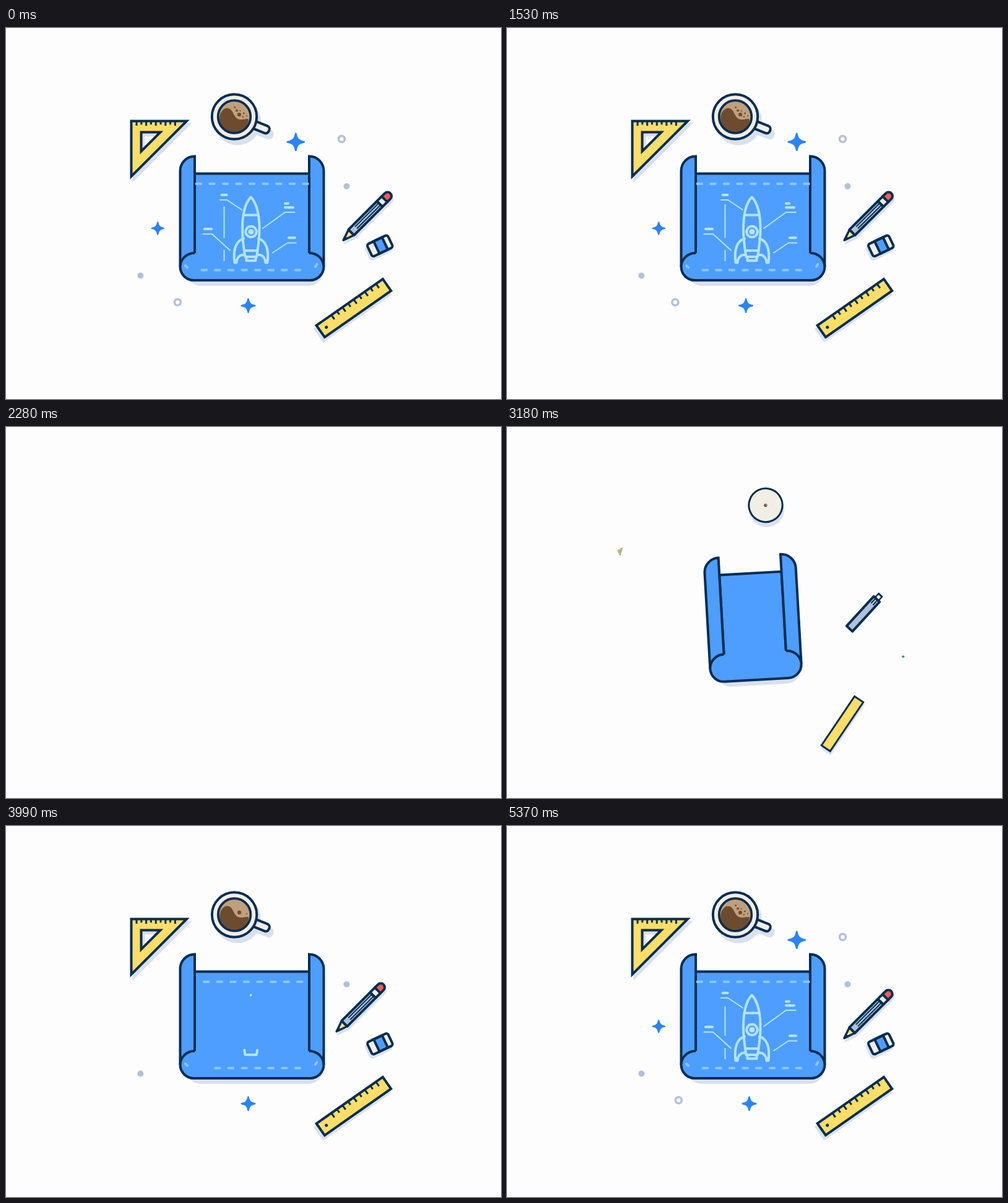
An HTML page that plays this animation: 800x600 px, repeating every 5.4 s.

```html
<!DOCTYPE html>
<html lang="en">
<head>
<meta charset="utf-8">
<title>Blueprint desk</title>
<style>
html, body { margin: 0; width: 100%; height: 100%; overflow: hidden; background: #fdfdfd; }
svg { display: block; width: 100%; height: 100%; }
.ink { stroke: #032d50; stroke-width: 4; }
.shade { fill: #d9e0ee; stroke: #d9e0ee; stroke-width: 4; }
.yellow { fill: #ffde68; }
.cream { fill: #f1eee6; }
.blue { fill: #4d9eff; }
.draw { fill: none; stroke: #b5e3ff; stroke-width: 4; stroke-linecap: round; stroke-linejoin: round; }
.thin { stroke-width: 2; }
.dash { fill: none; stroke: #8cc6ff; stroke-width: 4; stroke-linecap: round; }
.none { fill: none; }
</style>
</head>
<body>
<svg viewBox="0 0 800 600" id="stage">
  <g id="ringA"><circle r="5" fill="#fdfdfd" stroke="#b2c1d8" stroke-width="3.6"/></g>
  <g id="ringB"><circle r="5" fill="#fdfdfd" stroke="#b2c1d8" stroke-width="3.6"/></g>
  <g id="dotA"><circle r="5" fill="#b2c1d8"/></g>
  <g id="dotB"><circle r="5" fill="#b2c1d8"/></g>
  <g id="starA"></g><g id="starB"></g><g id="starC"></g>

  <g id="triangle">
    <path class="shade" fill-rule="evenodd" transform="translate(4 5)" d="M-29.5 -29.5H60L-29.5 60ZM-13.5 -11.5V19.5L17.5 -11.5Z"/>
    <path class="ink yellow" fill-rule="evenodd" d="M-29.5 -29.5H60L-29.5 60ZM-13.5 -11.5V19.5L17.5 -11.5Z"/>
    <path class="ink none" id="triTicks" style="stroke-width:3"/>
  </g>

  <g id="ruler">
    <g transform="translate(-2 6)"><rect class="shade" transform="rotate(-35)" x="-65.5" y="-11.6" width="131" height="23.2"/></g>
    <g transform="rotate(-35)">
      <rect class="ink yellow" x="-65.5" y="-11.6" width="131" height="23.2"/>
      <path class="ink none" id="rulerTicks" style="stroke-width:3"/>
      <circle id="hole" cx="-54" r="2.5" fill="#032d50"/>
    </g>
  </g>

  <g id="eraser">
    <g transform="translate(-2 5)"><rect class="shade" transform="rotate(-25.5)" x="-18.5" y="-11" width="37" height="22" rx="3.5"/></g>
    <g transform="rotate(-25.5)">
      <rect class="cream" x="-18.5" y="-11" width="37" height="22" rx="3.5"/>
      <rect class="ink blue" x="-6" y="-11" width="15" height="22"/>
      <rect class="ink none" x="-18.5" y="-11" width="37" height="22" rx="3.5"/>
    </g>
  </g>

  <g id="cup">
    <g class="shade" transform="translate(5 8)">
      <circle r="36"/>
      <rect data-grip transform="rotate(22)" x="30" y="-6.2" width="30.5" height="12.4" rx="5.5"/>
    </g>
    <rect class="ink cream" data-grip transform="rotate(22)" x="30" y="-6.2" width="30.5" height="12.4" rx="5.5"/>
    <circle class="ink cream" r="36.2"/>
    <g id="coffee">
      <circle r="26.5" fill="#c0a07c"/>
      <path fill="#6d4b2f" d="M-22.5 -5C-17 -16 -8 -17 -3 -8C1 0 3 4 10 4.500C15 5 19 2.500 23 4A23.500 23.500 0 1 1 -22.500 -5Z"/>
      <g id="bubbles" fill="#6d4b2f"></g>
      <circle class="ink none" r="26.300" style="stroke-width:3.7"/>
    </g>
  </g>

  <g id="pencil">
    <g transform="translate(-40.5 39.500)">
      <g transform="translate(2 5)"><path class="shade" id="pencilShade" transform="rotate(-45)" d="M4 0L19 -5.500H102A5.500 5.500 0 0 1 102 5.500H19Z"/></g>
      <g transform="rotate(-45)" stroke-linejoin="round">
        <g id="cap"><path class="ink" fill="#ff5a52" d="M0 -6.400H8A6.400 6.400 0 0 1 8 6.400H0Z"/></g>
        <g id="ferrule"><rect class="ink cream" y="-6.400" width="11" height="12.800"/></g>
        <g id="nib">
          <path class="ink" fill="#ffe28c" style="stroke-width:3.5" d="M-18 0L0 -6.200V6.200Z"/>
          <path fill="#032d50" d="M-19 0L-11 -3V3Z"/>
        </g>
        <g id="shaft">
          <rect class="ink" fill="#b0c1da" y="-6.400" width="65" height="12.800"/>
          <path class="ink none" id="grooves" style="stroke-width:1.9"/>
        </g>
      </g>
    </g>
  </g>

  <g id="scroll">
    <g transform="translate(-17.5 0)">
      <rect class="shade" id="sheetShade" y="-60" height="167" rx="22"/>
      <path class="ink blue" id="sheet"/>
      <path class="ink blue" id="curlL"/>
      <path class="ink blue" id="curlR"/>
      <path class="ink blue" id="roll"/>
    </g>
    <g id="plan" transform="translate(-415 -308)">
      <path class="dash" id="dashTop" stroke-linecap="butt"/>
      <path class="dash" id="dashLow"/>
      <path class="dash" id="dashEnds" d="M290 384.500L293 387.500M500 386L502.500 382"/>
      <g id="lines"></g>
      <path class="draw thin" id="rule" style="stroke-linecap:butt"/>
      <circle id="badge" cx="396" cy="329.500" fill="#b5e3ff"/>
    </g>
  </g>
</svg>
<script>
const LOOP = 5400;
const $ = id => document.getElementById(id);
const NS = 'http://www.w3.org/2000/svg';
const clamp = u => Math.max(0, Math.min(1, u));
const span = (t, start, dur) => clamp((t - start) / dur);
const out = u => 1 - (1 - u) ** 3;
const inOut = u => u < .5 ? 4 * u ** 3 : 1 - 4 * (1 - u) ** 3;
const back = u => 1 + 2.4 * (u - 1) ** 3 + 1.4 * (u - 1) ** 2;
const pop = (t, start, dur = 260) => t <= start ? 0 : back(span(t, start, dur));
const lerp = (a, b, u) => a + (b - a) * u;
const show = (el, on) => el.setAttribute('visibility', on ? 'inherit' : 'hidden');
const place = (el, x, y, r, sx, sy = sx) => {
  show(el, sx > .001);
  el.setAttribute('transform', `translate(${x} ${y}) rotate(${r}) scale(${sx} ${sy})`);
};
const add = (parent, tag, attrs) => {
  const el = document.createElementNS(NS, tag);
  for (const k in attrs) el.setAttribute(k, attrs[k]);
  return parent.appendChild(el);
};

// Resting centre, entry (start, offset, turn), exit (start, acceleration, turn).
const props = [
  { id: 'cup', at: [369, 143.5], from: [3069, 49, -17, 20], go: [1549, .0042, 13] },
  { id: 'ruler', at: [562, 453], from: [3074, -20, 27, -21], go: [1732, .0042, -4] },
  { id: 'eraser', at: [604.3, 352.3], from: [3170, 36, 19, 30], go: [1850, .0044, -6] },
  { id: 'triangle', at: [232, 180], from: [3170, -52, 22, -30], go: [1530, .0051, 7], early: true }
];
const decor = [
  { id: 'ringA', at: [542.5, 179.5], start: 4250, go: [1800, .0042] },
  { id: 'ringB', at: [277.3, 443.5], start: 4480, go: [1494, .0042] },
  { id: 'dotA', at: [550.5, 256], start: 3760, go: [1741, .0042] },
  { id: 'dotB', at: [217.3, 400.5], start: 3740, go: [1583, .0042] },
  { id: 'starA', at: [468.3, 184.3], size: 14.8, start: 4150, go: [1685, .0042] },
  { id: 'starB', at: [391.5, 449], size: 12, start: 3700, go: [1494, .0042] },
  { id: 'starC', at: [245.2, 324], size: 10.8, start: 4460, go: [1530, .0051] }
];
for (const d of decor) if (d.size) add($(d.id), 'path', {
  transform: `scale(${d.size})`, fill: '#2a84fa', stroke: '#2a84fa', 'stroke-width': .2, 'stroke-linejoin': 'round',
  d: 'M0 -.9C.12 -.3 .3 -.12 .9 0C.3 .12 .12 .3 0 .9C-.12 .3 -.3 .12 -.9 0C-.3 -.12 -.12 -.3 0 -.9Z'
});

const bubbles = [[8, -3.5, 3.1], [4, -10, 1.9], [.7, -15, 1.4], [15.5, -5.5, 1.4], [14, 0, 1.2], [20, -1.5, 1.1], [9.5, -9.5, 1.1]]
  .map(([cx, cy, r], i) => ({ el: add($('bubbles'), 'circle', { cx, cy }), r, start: 3650 + (i * 3 % 7) * 210 }));

const fin = 'M384 340.500C372 344 366.500 358 369.500 379.500H372.500C373 371 378 366 386 367';
const flip = 'translate(792 0) scale(-1 1)';
// Path, start, duration, class, extra transform
const strokes = [
  ['M395.700 273.500C386 283 381.500 304 382 328C382.300 345 385 360 386.500 370H405C406.500 360 409.200 345 409.500 328C410 304 405.500 283 395.700 273.500', 3780, 620],
  ['M385.500 302.500H406.500', 4300, 250],
  ['M385.500 360H406.500', 4350, 250],
  [fin, 4300, 450],
  [fin, 4300, 450, '', flip],
  ['M388.500 371V376.300H403.500V371', 4450, 300],
  ['M396 320.800A8.700 8.700 0 1 1 395.990 320.800', 4400, 400],
  ['M381 294L357 278H346', 4550, 380, ' thin'],
  ['M415 324L451 298H466.500', 4600, 380, ' thin'],
  ['M362 359.500L333 333.300H318.500', 4650, 380, ' thin'],
  ['M431 363.500L455 347.500H468.500', 4700, 300, ' thin'],
  ['M348.500 270H356.500', 4800, 180],
  ['M451 283.800H456', 4780, 180],
  ['M451 290.200H464', 4800, 180],
  ['M321 325H332', 4820, 180],
  ['M457 339.300H467', 4820, 180]
].map(([d, start, dur, kind = '', transform = '']) =>
  ({ start, dur, el: add($('lines'), 'path', { d, class: 'draw' + kind, transform, pathLength: 1 }) }));

const exit = ([start, k, turn = 0], t) => {
  const dx = k * Math.max(0, t - LOOP - start) ** 2;
  return [dx, turn * (1 - Math.exp(-dx / 150))];
};

const ticks = (n, x0, step, y, len, t, start) => {
  let d = '';
  for (let i = 0; i < n; i++) {
    const u = out(span(t, start + i * 25, 200));
    if (u > 0) d += `M${x0 + i * step} ${y}v${(len - i % 2 * 1.8) * u}`;
  }
  return d;
};

function drawProps(t) {
  for (const { id, at, from, go, early } of props) {
    const [start, ox, oy, turn] = from;
    const left = 1 - (early ? out(span(t, start, 600)) : inOut(span(t, 3230, 830)));
    const [dx, r] = exit(go, t);
    place($(id), at[0] + ox * left - dx, at[1] + oy * left, turn * left + r, out(span(t, start, 300)));
  }
  for (const { id, at, start, go } of decor) {
    place($(id), at[0] - exit(go, t)[0], at[1], 0, pop(t, start));
  }
  $('triTicks').setAttribute('d', ticks(9, -21, 7.8, -29, 7, t, 3350));
  $('rulerTicks').setAttribute('d', ticks(9, -36, 11, -11, 8, t, 3300));
  $('hole').setAttribute('r', 2.5 * pop(t, 3350));
  place($('coffee'), 0, 0, 0, out(span(t, 3165, 340)));
  const grip = 30.5 * out(span(t, 3280, 300));
  document.querySelectorAll('[data-grip]').forEach(el => el.setAttribute('width', grip));
  for (const b of bubbles) b.el.setAttribute('r', b.r * pop(t, b.start, 350));
}

// Sideways scribble of the pencil while it draws.
function scribble(t) {
  if (t < 3990) return lerp(5.5, 11, inOut(span(t, 3180, 810)));
  if (t < LOOP) return lerp(11, 4, span(t, 3990, 1410)) * Math.cos(Math.PI * (t - 3990) / 402.86) ** 2;
  return t < LOOP + 1410 ? 4 * Math.sin(Math.PI * (t - LOOP) / 470) ** 2 : 0;
}

function drawPencil(t) {
  const [dx, r] = exit([1652, .0042, -8.4], t);
  const d = scribble(t);
  const tilt = -2.5 * (1 - span(t, 3180, 500));
  place($('pencil'), 585 - d - dx, 304.5 - d, tilt + r, t > 2980 ? 1 : 0);
  const grow = out(span(t, 2980, 190));
  place($('shaft'), lerp(84, 19, grow), 0, 0, grow, 1);
  show($('shaft'), grow > 0);
  place($('ferrule'), 84, 0, 0, out(span(t, 3120, 150)), lerp(.4, 1, span(t, 3130, 150)));
  place($('cap'), 94, 0, 0, pop(t, 3230));
  place($('nib'), 19, 0, 0, pop(t, 3230));
  show($('pencilShade'), t > 3300);
  const x = lerp(65, 11, out(span(t, 3150, 400)));
  $('grooves').setAttribute('d', t > 3150 ? `M${x} -2.100H65M${x} 2.100H65` : '');
}

function drawScroll(t) {
  const [dx, r] = exit([1572, .0042, -12], t);
  const turn = -22 * (1 - out(span(t, 2710, 1000)));
  place($('scroll'), 415 - dx, 308, turn + r, pop(t, 2710, 300));
  const w = 92.5 * out(span(t, 3088, 400));
  const curl = s => `M${s * w} 56V-100.500A23.500 23.500 0 0 ${s < 0 ? 0 : 1} ${s * (w + 23.5)} -77V78`;
  $('sheet').setAttribute('d', `M${-w} 70V-72.500H${w}V70`);
  $('curlL').setAttribute('d', curl(-1));
  $('curlR').setAttribute('d', curl(1));
  $('roll').setAttribute('d', `M${-w} 56A22.700 22.700 0 0 0 ${-w - 23.5} 78A22 22 0 0 0 ${-w - 1} 100H${w + 1}A22 22 0 0 0 ${w + 23.5} 78A22.700 22.700 0 0 0 ${w} 56`);
  $('sheetShade').setAttribute('x', -w - 12);
  $('sheetShade').setAttribute('width', 2 * w + 32.5);
}

function drawPlan(t) {
  const half = 91.5 * out(span(t, 3640, 720));
  let top = '';
  for (let x = 397.5 - half; x < 397.5 + half - 6; x += 21.6) {
    top += `M${x + 1.5} 252H${Math.min(x + 9, 488)}`;
  }
  $('dashTop').setAttribute('d', top);
  const edge = lerp(480, 314, out(span(t, 3620, 760)));
  let low = '';
  for (let i = 0; i < 8; i++) {
    const x = 315 + i * 21.6;
    if (x + 8 > edge) low += `M${Math.max(x + 1.5, edge)} 391.500H${x + 9}`;
  }
  $('dashLow').setAttribute('d', t > 3620 ? low : '');
  show($('dashEnds'), t > 3640);

  strokes.forEach(({ el, start, dur }, i) => {
    const p = inOut(span(t, start, dur));
    show(el, p > 0);
    // The hull opens from its base in both directions.
    el.setAttribute('stroke-dasharray', p === 1 ? 'none' : i ? `${p} 2` : `0 ${(1 - p) / 2} ${p} 2`);
  });
  $('badge').setAttribute('r', 4.6 * pop(t, 4700));

  const tip = 285 + 91 * (1 - span(t, 5010, 490)) ** 2;
  let d = tip < 376 ? `M352.500 377V${Math.max(tip, 359)}` : '';
  if (tip < 339.5) d += `M352.500 339.500V${tip}`;
  $('rule').setAttribute('d', d);
}

function render(ms) {
  const now = ms % LOOP;
  // The scene builds late in the loop and leaves early in the next one.
  const t = now < 2300 ? now + LOOP : now;
  drawProps(t);
  drawPencil(t);
  drawScroll(t);
  drawPlan(t);
}

let begin;
function tick(now) {
  if (begin === undefined) begin = now;
  render(now - begin);
  requestAnimationFrame(tick);
}
render(0);
requestAnimationFrame(tick);
</script>
</body>
</html>
```
